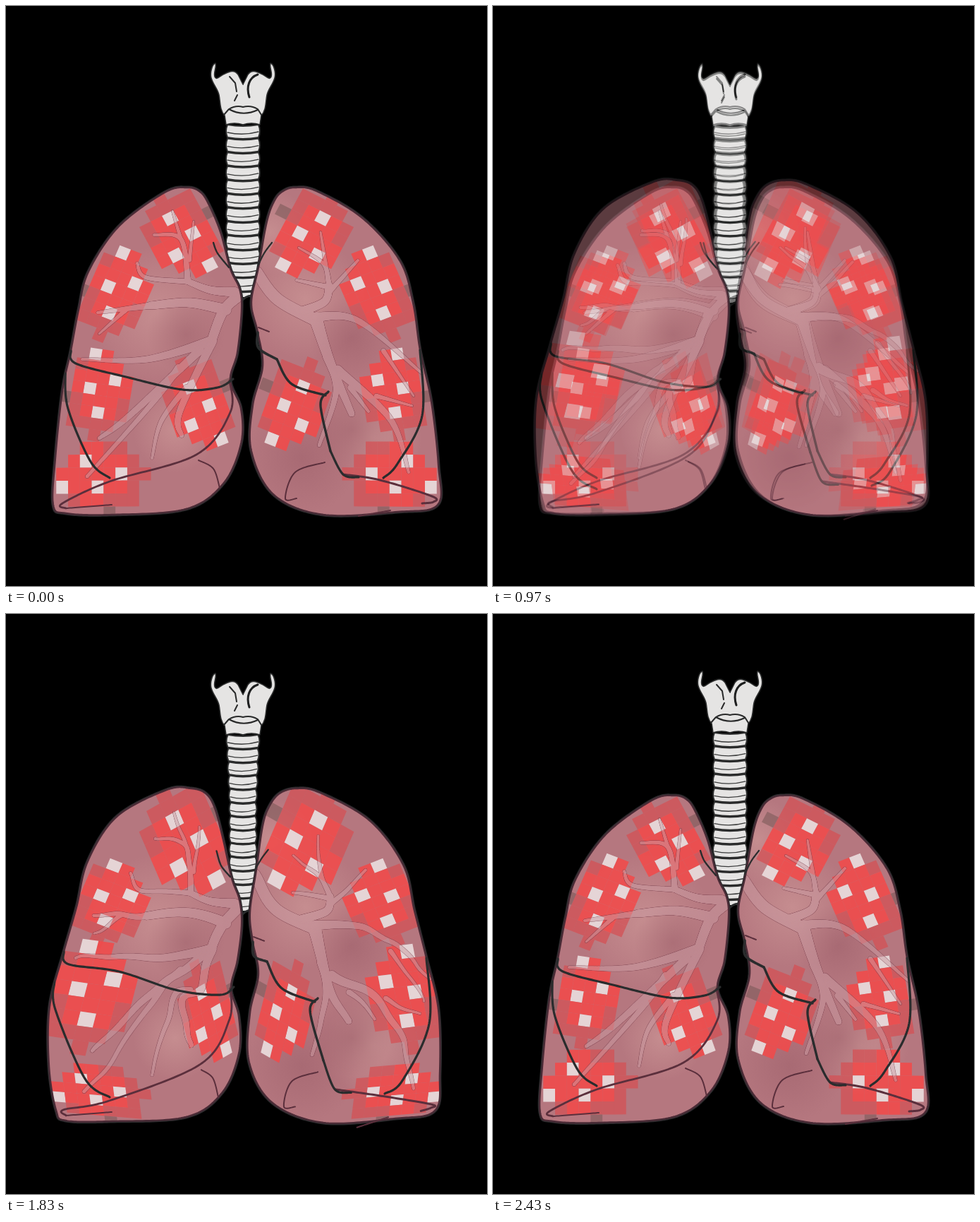
An HTML page with a canvas that plays this animation: 682x821 px, repeating every 2.46 s.

```html
<!DOCTYPE html>
<html lang="en">
<head>
<meta charset="utf-8">
<title>Breathing lungs</title>
<style>
html, body { margin: 0; width: 100%; height: 100%; overflow: hidden; background: #000; }
canvas { position: absolute; left: 0; top: 0; width: 682px; height: 821px; }
#full { opacity: 0; }
</style>
</head>
<body>
<canvas id="rest" width="682" height="821"></canvas>
<canvas id="full" width="682" height="821"></canvas>
<script>
const W = 682, H = 821, LOOP = 2460;

const pairs = a => a.flatMap((v, i) => i % 2 ? [] : [[v, a[i + 1]]]);
const mirror = a => a.map((v, i) => i % 2 ? v : W - v);

// Lung outlines, exhaled and inhaled, point for point.
const leftRest = pairs([257,257, 275,263, 287,280, 304,320, 318,372, 331,400, 334,430, 328,490, 318,530, 333,570, 333,620,
  308,676, 255,712, 150,720, 85,718, 67,706, 70,640, 80,545, 92,488, 103,430, 117,376, 160,312, 225,264]);
const leftFull = pairs([262,247, 283,254, 296,275, 308,320, 320,374, 331,405, 334,440, 328,490, 319,530, 330,570, 330,622,
  306,678, 255,712, 150,718, 85,717, 71,702, 61,640, 62,555, 82,478, 100,415, 116,350, 157,287, 228,249]);
const rightRest = pairs([410,257, 440,262, 505,300, 558,360, 577,420, 587,487, 603,560, 613,650, 612,706, 555,716, 450,720,
  380,692, 348,630, 350,565, 364,510, 357,462, 348,420, 358,370, 370,305, 381,275, 393,262]);
const rightFull = pairs([412,247, 445,253, 515,292, 563,355, 579,420, 596,487, 613,560, 615,650, 608,703, 552,714, 450,720,
  378,692, 345,635, 346,565, 358,510, 350,464, 346,422, 355,362, 364,300, 373,273, 388,254]);

// Patches: hub cell, far cell and two side cells of one pixel sprite.
const patchLeft = [
  [265,322, 289,366, 241,353, 233,300], [145,397, 166,350, 183,393, 147,435], [119,541, 127,494, 155,529, 130,577],
  [288,565, 305,612, 263,594, 261,538], [130,681, 80,680, 113,645, 164,661]
];
const patchLeftFull = [
  [274,319, 295,375, 247,359, 235,291], [135,399, 154,352, 176,401, 141,429], [102,531, 119,477, 151,514, 116,581],
  [299,563, 311,613, 278,597, 276,532], [128,688, 78,683, 105,658, 165,676]
];
const patchRest = [...patchLeft, ...patchLeft.map(mirror)];
const patchFull = [...patchLeftFull, ...patchLeftFull.map(mirror)];
patchFull[7] = [580,535, 565,482, 541,518, 564,581];

// Fissure landmarks at rest and inhaled.
const markRest = pairs([147,668, 250,543, 170,525, 210,658, 88,570, 300,605, 384,500, 452,551, 460,630, 490,667, 535,668, 590,580]);
const markFull = pairs([147,684, 240,532, 160,506, 210,671, 70,560, 305,607, 370,492, 437,549, 450,632, 478,677, 537,679, 600,580]);

const from = [...leftRest, ...rightRest, ...markRest, ...patchRest.flatMap(pairs)];
const to = [...leftFull, ...rightFull, ...markFull, ...patchFull.flatMap(pairs)];

const still = p => p;
const inhale = ([x, y]) => {
  let dx = 0, dy = 0, sum = 0;
  from.forEach(([ax, ay], i) => {
    const w = 1 / ((x - ax) ** 2 + (y - ay) ** 2 + 30) ** 2;
    dx += w * (to[i][0] - ax); dy += w * (to[i][1] - ay); sum += w;
  });
  return [x + dx / sum, y + dy / sum];
};

const sprite = ['..rrmm..', '.rwrrrm.', 'rrrrrwmm', 'wrrwrrm.', '.mrrmmm.', '....g...'];
const tint = { r: 'rgba(242,74,74,.88)', m: 'rgba(212,80,84,.75)', g: 'rgba(130,92,92,.65)', w: 'rgba(232,218,219,.95)' };

// Bronchi: start width, end width, then points.
const treeLeft = [
  [15, 12, 333,408, 308,432, 290,478], [13, 7, 325,405, 290,402, 258,390], [7, 3, 258,390, 198,384, 186,364],
  [8, 3, 258,390, 248,330, 210,324], [5, 2, 248,330, 236,290], [5, 2, 260,360, 266,305],
  [15, 10, 312,430, 260,420, 205,424], [9, 3, 205,424, 130,434], [6, 2, 170,430, 132,464],
  [14, 3, 292,474, 200,500, 108,500], [12, 4, 275,487, 175,580, 132,612], [10, 4, 245,512, 205,565, 115,666],
  [12, 5, 292,476, 246,575, 249,608], [8, 3, 256,540, 220,588, 207,640]
];
const treeRight = [
  [15, 17, 355,376, 385,415, 440,445], [18, 8, 440,445, 458,500, 490,577], [7, 3, 488,540, 514,574],
  [12, 9, 420,432, 452,418, 458,395], [7, 3, 458,398, 412,388], [7, 2, 458,395, 450,365, 415,342],
  [7, 2, 458,395, 446,320], [7, 3, 458,405, 499,360], [13, 3, 440,440, 500,446, 590,520], [6, 2, 535,488, 578,552],
  [13, 3, 470,515, 545,585, 571,660], [6, 2, 525,552, 576,566], [12, 4, 455,495, 468,545, 444,622]
];

// Contour lines: width, then points.
const ink = '#2a2c2d', plum = '#5b2f3c';
const inkLines = [
  [3.2, 92,488, 99,506, 170,525, 250,543, 300,540, 322,528], [3.2, 84,520, 88,570, 120,645, 147,668],
  [2.4, 294,335, 300,350, 316,370], [3.6, 357,462, 358,484, 384,500], [3.4, 384,500, 405,535, 453,551],
  [3.4, 457,546, 446,565, 460,630], [3.2, 460,630, 478,663, 500,667],
  [3.2, 587,487, 590,580, 555,648, 535,668], [2.2, 377,335, 366,350, 357,368]
];
const plumLines = [
  [2.8, 85,711, 80,704, 147,673, 270,635, 318,575, 317,530], [2, 85,711, 150,706], [2, 273,643, 294,655, 303,682],
  [3, 478,663, 530,671, 604,694, 606,702, 590,704], [2, 412,697, 396,697, 410,660, 452,646],
  [2, 358,455, 373,461], [2, 500,722, 545,714]
];

// Catmull-Rom samples through the points.
function curve(pts, closed) {
  const n = pts.length, out = [], last = closed ? n : n - 1;
  const at = i => closed ? pts[(i + n) % n] : pts[Math.max(0, Math.min(n - 1, i))];
  for (let i = 0; i < last; i++) {
    const [a, b, c, d] = [at(i - 1), at(i), at(i + 1), at(i + 2)];
    for (let s = 0; s < 24; s++) {
      const t = s / 24;
      out.push([0, 1].map(k => b[k] + t * ((c[k] - a[k]) + t * ((2 * a[k] - 5 * b[k] + 4 * c[k] - d[k])
        + t * (3 * b[k] - a[k] - 3 * c[k] + d[k]))) / 2));
    }
  }
  if (!closed) out.push(pts[n - 1]);
  return out;
}

function path(pts, closed) {
  const p = new Path2D();
  curve(pts, closed).forEach(([x, y]) => p.lineTo(x, y));
  if (closed) p.closePath();
  return p;
}

function stroke(g, p, color, width) {
  g.strokeStyle = color;
  g.lineWidth = width;
  g.stroke(p);
}

function glow(g, x, y, r, color) {
  const f = g.createRadialGradient(x, y, 0, x, y, r);
  f.addColorStop(0, `rgba(${color},.5)`);
  f.addColorStop(1, `rgba(${color},0)`);
  g.fillStyle = f;
  g.fillRect(x - r, y - r, 2 * r, 2 * r);
}

function windpipe(g, full) {
  const y0 = full ? 171 : 168, step = full ? 19.2 : 19.6;
  g.save();
  g.fillStyle = '#e5e4e3';
  g.translate(336, 0);
  for (let i = 0; i < 13; i++) {
    const y = y0 + i * step, b = y + step - 1.5, m = (y + b) / 2;
    const h = full ? Math.max(19.5, 23.5 - i * .9) : 24, e = h - 2, o = h + 2;
    const ring = new Path2D(`M${-e} ${y}Q0 ${y + 4} ${e} ${y}Q${o} ${m} ${e} ${b}Q0 ${b + 4} ${-e} ${b}Q${-o} ${m} ${-e} ${y}Z`);
    g.fill(ring);
    stroke(g, ring, '#2b2c2c', 2);
    stroke(g, new Path2D(`M${-e} ${y + 11}Q0 ${y + 16} ${e} ${y + 10}`), '#3a3b3b', 1.3);
  }
  g.translate(0, full ? 3 : 0);
  const side = 'M0 111L7 97C12 90 18 92 26 96C33 99 38 106 40 100C42 94 37 87 39 81C44 82 47 95 45 102C42 112 36 117 34 126C32 136 33 148 26 155L24 168Q12 164 0 168';
  for (const flip of [1, -1]) {
    g.scale(flip, 1);
    const half = new Path2D(side);
    g.fill(half);
    stroke(g, half, '#2b2c2c', 1.6);
    g.scale(flip, 1);
  }
  g.fillRect(-1, 113, 2, 53);
  stroke(g, new Path2D('M21 97C9 101 4 114 9 129'), '#1e1f1f', 3);
  stroke(g, new Path2D('M-19 100L-11 109L-9 121M-8 126L-12 134M-27 154L-20 146Q-10 140 0 143Q11 140 21 146L26 154M-20 146Q0 157 21 147'), '#292a2a', 2);
  g.restore();
}

function patch(g, [hx, hy, fx, fy, cx, cy, dx, dy]) {
  const fit = (h, f, c, d) => [(3 * (h - f) + (h - c) + 2 * (d - h)) / 14, (2 * (h - c) + (h - d)) / 5];
  const [ux, vx] = fit(hx, fx, cx, dx), [uy, vy] = fit(hy, fy, cy, dy);
  g.save();
  g.transform(ux, uy, vx, vy, hx, hy);
  sprite.forEach((row, j) => [...row].forEach((k, i) => {
    if (k === '.') return;
    g.fillStyle = tint[k];
    g.fillRect(i - 3.5, j - 3.5, 1, 1);
  }));
  g.restore();
}

function bronchi(warp) {
  const layer = document.createElement('canvas');
  layer.width = W; layer.height = H;
  const g = layer.getContext('2d');
  for (const [extra, color] of [[1.5, '#7d4653'], [0, '#cb9ca3']]) {
    g.fillStyle = color;
    for (const [w0, w1, ...pts] of [...treeLeft, ...treeRight]) {
      const c = curve(pairs(pts)).map(warp);
      c.forEach(([x, y], i) => {
        const [nx, ny] = c[Math.min(i + 1, c.length - 1)];
        const r = (w0 + (w1 - w0) * i / c.length + extra) / 2;
        for (let s = 0; s < 1; s += .25) {
          g.beginPath();
          g.arc(x + (nx - x) * s, y + (ny - y) * s, r, 0, 7);
          g.fill();
        }
      });
    }
  }
  return layer;
}

function draw(id, full) {
  const g = document.getElementById(id).getContext('2d');
  const warp = full ? inhale : still;
  const outlines = (full ? [leftFull, rightFull] : [leftRest, rightRest]).map(p => path(p, true));
  const lungs = new Path2D();
  outlines.forEach(p => lungs.addPath(p));
  g.lineCap = g.lineJoin = 'round';
  g.fillStyle = '#000';
  g.fillRect(0, 0, W, H);
  windpipe(g, full);
  const end = full ? 421 : 412;
  g.fillStyle = '#000';
  g.fillRect(310, end, 54, 40);
  stroke(g, new Path2D(`M333 ${end + 8}Q338 ${end - 2} 349 ${end - 2}`), ink, 3);

  outlines.forEach(p => stroke(g, p, '#2b2b2d', 5));
  g.save();
  g.clip(lungs);
  g.fillStyle = '#b5777f';
  g.fillRect(0, 0, W, H);
  for (const [x, y, r] of [[215, 435, 95], [425, 415, 85], [375, 320, 60], [520, 610, 70], [240, 600, 60]])
    glow(g, x, y, r, '214,163,160');
  for (const [x, y, r] of [[255, 465, 55], [490, 470, 60], [420, 640, 80], [490, 600, 55]])
    glow(g, x, y, r, '155,93,104');
  (full ? patchFull : patchRest).forEach(p => patch(g, p));
  g.globalAlpha = .5;
  g.drawImage(bronchi(warp), 0, 0);
  g.restore();

  outlines.forEach(p => stroke(g, p, '#4a2b36', 2.4));
  for (const [set, color] of [[plumLines, plum], [inkLines, ink]])
    for (const [width, ...pts] of set) stroke(g, path(pairs(pts).map(warp)), color, width);
}

draw('rest', false);
draw('full', true);

// Cross-fade between the two breaths.
const steps = [[0, 0], [870, 0], [1070, 1], [1870, 1], [2070, 0], [LOOP, 0]];
document.getElementById('full').animate(
  steps.map(([t, opacity]) => ({ offset: t / LOOP, opacity })),
  { duration: LOOP, iterations: Infinity }
);
</script>
</body>
</html>
```
